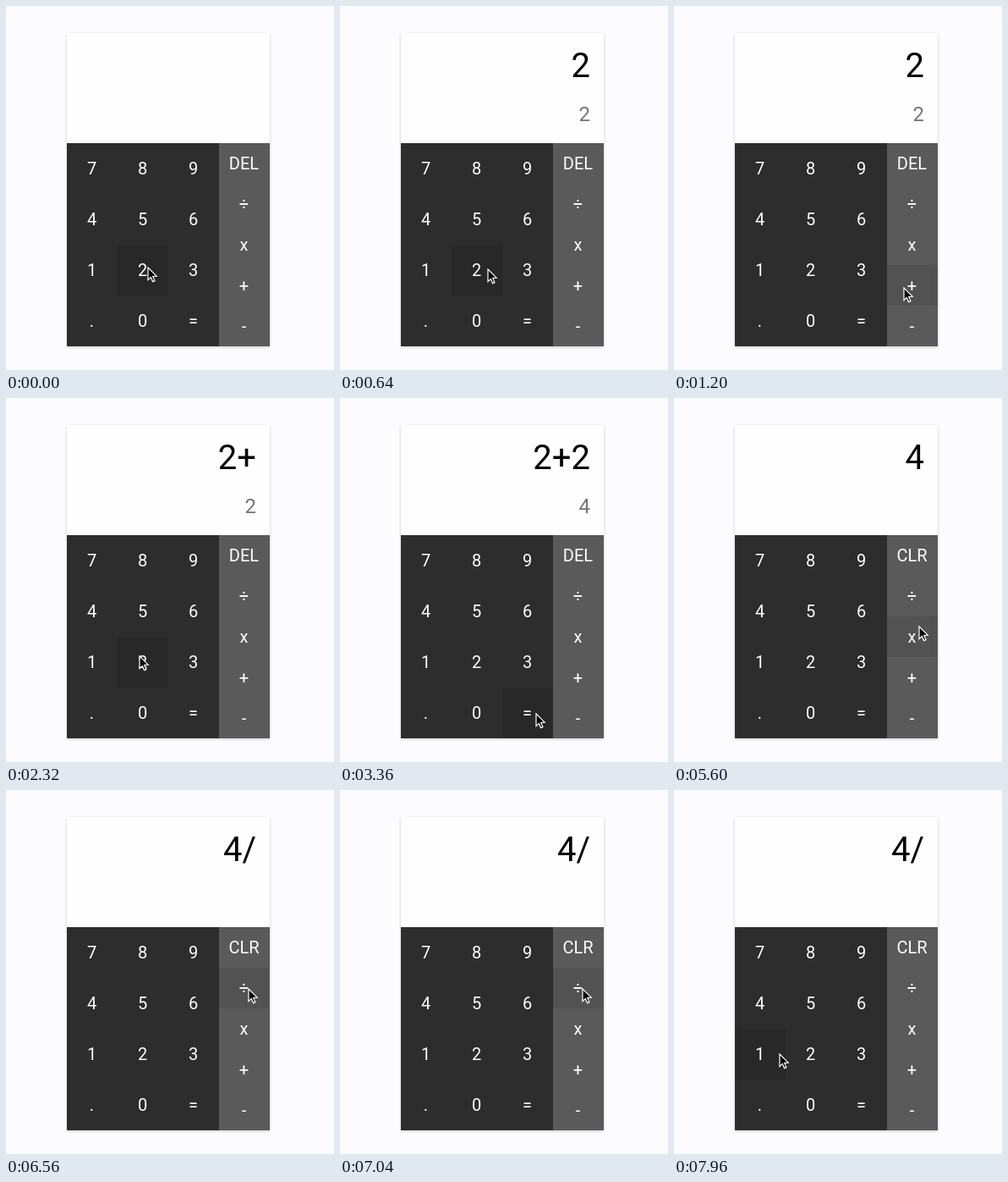
An HTML page with a canvas that plays this animation: 388x430 px, repeating every 8 s.

```html
<!DOCTYPE html>
<html lang="en">
<head>
<meta charset="utf-8">
<title>Calculator</title>
<style>
html, body { margin: 0; width: 100%; height: 100%; overflow: hidden; background: #fcfcff; }
canvas { display: block; width: 388px; height: 430px; }
</style>
</head>
<body>
<canvas id="stage"></canvas>
<script>
const W = 388, H = 430, LOOP = 8000;
const canvas = document.getElementById('stage');
const ctx = canvas.getContext('2d');
const dpr = window.devicePixelRatio || 1;
canvas.width = W * dpr;
canvas.height = H * dpr;

const LEFT = 72, TOP = 32, KEYS_TOP = 162, CELL = 60, OP_CELL = 48;
const WIDTH = 4 * CELL, HEIGHT = 370, OPS_LEFT = LEFT + 3 * CELL;
const TEXT_RIGHT = LEFT + WIDTH - 16, SLIDE = 320;

const buttons = [
  ...[...'789456123.0='].map((label, i) => ({
    label, x: LEFT + i % 3 * CELL, y: KEYS_TOP + Math.floor(i / 3) * CELL,
    h: CELL, hover: '#282828'
  })),
  ...['DEL', '÷', 'x', '+', '-'].map((label, i) => ({
    label, x: OPS_LEFT, y: KEYS_TOP + i * OP_CELL, h: OP_CELL, hover: '#525252'
  }))
];

// Buttons the pointer visits; dx, dy is its offset from the button centre
const stops = [
  { key: '2', dx: 6, dy: -3, arrive: 0, press: 400 },
  { key: '+', dx: -10, dy: 3, arrive: 1120, press: 1440 },
  { key: '2', dx: -4, dy: -7, arrive: 2240, press: 2640 },
  { key: '=', dx: 10, dy: 1, arrive: 3360, press: 4000 },
  { key: 'x', dx: 8, dy: -12, arrive: 5600 },
  { key: '÷', dx: 5, dy: 1, arrive: 6080, press: 6400 },
  { key: '1', dx: 23, dy: 0, arrive: 7940 }
].map(s => {
  const b = buttons.find(b => b.label === s.key);
  return { ...s, x: b.x + CELL / 2 + s.dx, y: b.y + b.h / 2 + s.dy };
});

const clamp = v => Math.max(0, Math.min(1, v));
const ease = v => v * v * (3 - 2 * v);
const mix = (a, b, k) => a + (b - a) * k;

// Longer ways take longer
function pointerAt(t) {
  let { x, y } = stops[0];
  for (const s of stops.slice(1)) {
    const travel = 300 + 2.5 * Math.hypot(s.x - x, s.y - y);
    const k = ease(clamp((t - s.arrive + travel) / travel));
    x = mix(x, s.x, k);
    y = mix(y, s.y, k);
    if (k < 1) break;
  }
  return [x, y];
}

// Replays all presses up to time t
function calculatorAt(t) {
  const c = { formula: '', preview: '', old: '', solvedAt: Infinity };
  for (const { key, press } of stops) {
    if (!(press <= t)) continue;
    if (key === '=') {
      Object.assign(c, { old: c.formula, formula: c.preview, preview: '', solvedAt: press });
    } else {
      c.formula += key === '÷' ? '/' : key;
      if (key >= '0' && key <= '9') {
        c.preview = String(c.formula.split('+').reduce((sum, n) => sum + Number(n), 0));
      }
    }
  }
  return c;
}

function rect(x, y, w, h, color) {
  ctx.fillStyle = color;
  ctx.fillRect(x, y, w, h);
}

function text(str, x, y, size, color, align = 'right') {
  ctx.font = `400 ${size}px Roboto, sans-serif`;
  ctx.textAlign = align;
  ctx.fillStyle = color;
  ctx.fillText(str, x, y);
}

function drawPanel() {
  rect(0, 0, W, H, '#fcfcff');
  ctx.save();
  ctx.shadowColor = 'rgba(0, 0, 0, .22)';
  ctx.shadowBlur = 3 * dpr;
  ctx.shadowOffsetY = dpr;
  rect(LEFT, TOP, WIDTH, HEIGHT, '#fefefe');
  ctx.restore();
}

function drawDisplay(calc, t) {
  // A fresh result grows from the preview line while the old formula fades
  const k = calc.old ? ease(clamp((t - calc.solvedAt) / SLIDE)) : 1;
  const shade = mix(117, 0, k);
  ctx.globalAlpha = 1 - k;
  text(calc.old, TEXT_RIGHT, 84 - 30 * k, 40, '#000');
  ctx.globalAlpha = 1;
  text(calc.formula, TEXT_RIGHT, mix(136, 84, k), mix(24, 40, k),
    `rgb(${shade}, ${shade}, ${shade})`);
  text(calc.preview, TEXT_RIGHT, 136, 24, '#757575');
}

function drawButtons(solved, px, py) {
  rect(LEFT, KEYS_TOP, 3 * CELL, 4 * CELL, '#2d2d2d');
  rect(OPS_LEFT, KEYS_TOP, CELL, 4 * CELL, '#5a5a5a');
  for (const { label, x, y, h, hover } of buttons) {
    const over = px >= x && px < x + CELL && py >= y && py < y + h;
    if (over) rect(x, y, CELL, h, hover);
    const shown = label === 'DEL' && solved ? 'CLR' : label;
    text(shown, x + CELL / 2 - 0.5, y + h / 2 + 7, 20, '#fff', 'center');
  }
}

function drawPointer(x, y) {
  ctx.save();
  ctx.translate(Math.round(x), Math.round(y));
  ctx.beginPath();
  [[0, 0], [0, 14.5], [3.3, 11.4], [5.6, 16.6], [7.9, 15.6], [5.7, 10.5], [10.2, 10.2]]
    .forEach(([a, b]) => ctx.lineTo(a, b));
  ctx.closePath();
  ctx.lineWidth = 1.2;
  ctx.strokeStyle = '#fff';
  ctx.fillStyle = '#000';
  ctx.fill();
  ctx.stroke();
  ctx.restore();
}

function frame() {
  const t = performance.now() % LOOP;
  const [px, py] = pointerAt(t);
  const calc = calculatorAt(t);
  ctx.setTransform(dpr, 0, 0, dpr, 0, 0);
  drawPanel();
  drawDisplay(calc, t);
  drawButtons(t >= calc.solvedAt, px, py);
  drawPointer(px, py);
  requestAnimationFrame(frame);
}
requestAnimationFrame(frame);
</script>
</body>
</html>
```
